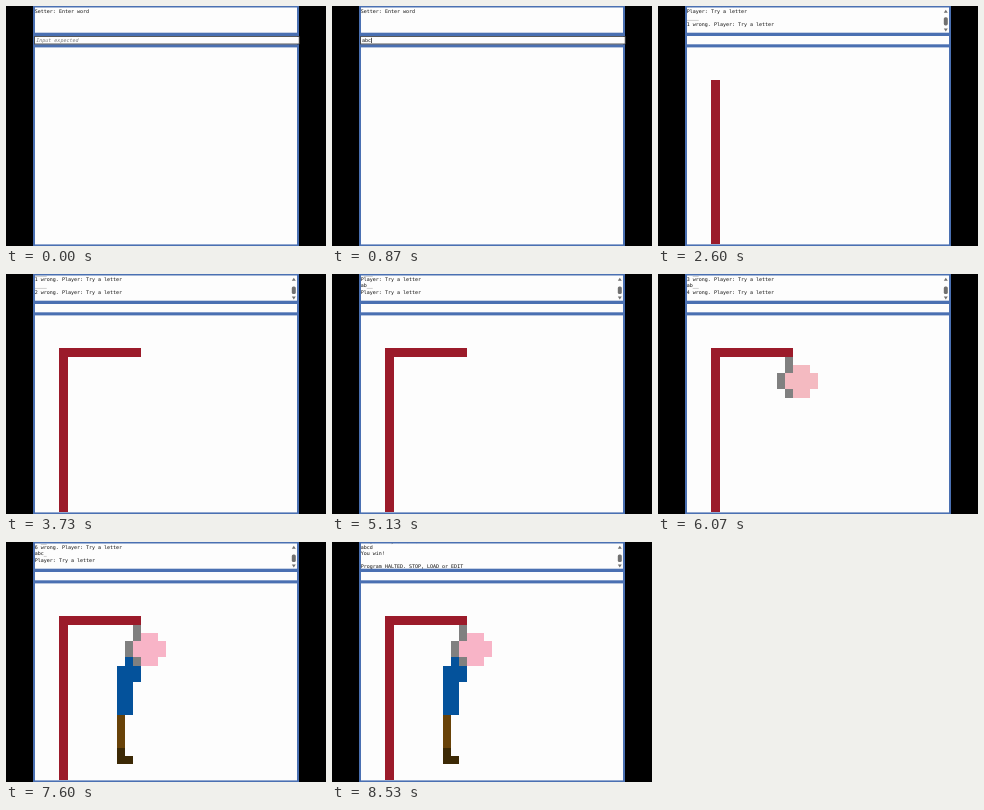
An HTML page for the animation above (8.59 s loop, 320 by 240 pixels).

```html
<!DOCTYPE html>
<html lang="en">
<head>
<meta charset="utf-8">
<title>Hangman</title>
<style>
  html, body { margin: 0; height: 100%; overflow: hidden; background: #000; }
  svg { display: block; width: 100%; height: 100%; }
  text { font: 5px "DejaVu Sans Mono", monospace; fill: #111; }
  #hint { font-style: italic; fill: #777; }
  .paper { fill: #fdfdfd; }
</style>
</head>
<body>
<svg viewBox="0 0 320 240">
  <clipPath id="top"><rect x="29" y="1.5" width="262" height="25.5"/></clipPath>
  <rect x="27" width="266" height="240" fill="#4a70b2"/>
  <rect class="paper" x="29" y="1.5" width="262" height="25.2"/>
  <rect class="paper" x="29" y="30" width="262" height="8.3"/>
  <rect class="paper" x="29" y="41.4" width="262" height="197"/>
  <g id="log" clip-path="url(#top)"></g>
  <g id="scroll" fill="#707070">
    <path d="M285.8 6.8h4l-2-3zM285.8 22.4h4l-2 3z"/>
    <rect id="thumb" x="285.8" width="4" rx="1.6"/>
  </g>
  <g id="input">
    <rect x="28.6" y="30.6" width="264.6" height="7.4" fill="#fdfdfd" stroke="#333" stroke-width=".8"/>
    <text id="hint" x="30.3" y="36">Input expected</text>
    <text id="typed" x="30" y="36"></text>
    <rect id="caret" y="31.8" width=".7" height="5.2" fill="#111"/>
  </g>
  <g id="drawing" transform="translate(28.8 41.6) scale(8.2)" shape-rendering="crispEdges"></g>
</svg>
<script>
const LOOP = 8590, PITCH = 6.2, CHAR = 3.01;
const $ = id => document.getElementById(id);
const ask = 'Player: Try a letter';
const wrong = n => `${n} wrong. ${ask}`;

// [time, lines printed]
const prints = [
  [0, 'Setter: Enter word'],
  [1200, ask],
  [2600, '____', wrong(1)],
  [3670, '____', wrong(2)],
  [4330, 'a___', ask],
  [5130, 'ab__', ask],
  [5670, 'ab__', wrong(3)],
  [6070, 'ab__', wrong(4)],
  [6470, 'ab__', wrong(5)],
  [6870, 'ab__', wrong(6)],
  [7400, 'abc_', ask],
  [8130, 'abcd', 'You win!', '', 'Program HALTED. STOP, LOAD or EDIT']
];
const keys = [200, 330, 870, 1000];

// Blocks on a 32 by 24 grid: path, start, first colour, settled colour, settling time
const red = [155, 27, 42], grey = [128, 128, 128], blue = [4, 82, 155];
const parts = [
  ['M3 4h1v20h-1z', 2600, red],
  ['M3 4h10v1h-10z', 3670, red],
  ['M12 5h1v2h-1zM11 7h1v2h-1zM13 7h1v2h-1zM12 9h1v1h-1z', 5670, grey],
  ['M13 6h2v1h1v2h-1v1h-2v-1h-1v-2h1z', 6070, [244, 186, 193], [248, 180, 199], 130],
  ['M11 9h1v1h1v2h-1v4h-2v-6h1z', 6470, blue],
  ['M10 16h1v5h-1z', 6870, [75, 59, 74], [104, 66, 8], 400],
  ['M10 20h1v1h1v1h-2z', 6870, [42, 42, 66], [60, 41, 5], 400]
].map(([d, start, from, to = from, span = 1]) => {
  const el = make('path', $('drawing'));
  el.setAttribute('d', d);
  return { el, start, from, to, span };
});
const rows = Array.from({ length: 5 }, () => make('text', $('log')));
rows.forEach(r => r.setAttribute('x', 28.8));

function make(tag, parent) {
  return parent.appendChild(document.createElementNS('http://www.w3.org/2000/svg', tag));
}
function show(el, on) {
  el.style.display = on ? '' : 'none';
}

function drawLog(t) {
  const lines = prints.filter(p => t >= p[0]).flatMap(p => p.slice(1));
  if (t < 8130) lines.push('');
  const scrolled = lines.length > 4;
  const first = scrolled ? lines.length - 5 : 0;
  const base = scrolled ? 7.2 - PITCH : 6.8;
  rows.forEach((row, i) => {
    row.textContent = lines[first + i] || '';
    row.setAttribute('y', base + i * PITCH);
  });
  show($('scroll'), scrolled);
  const height = lines.length > 5 ? 7.6 : 8.2;
  $('thumb').setAttribute('y', (lines.length > 5 ? 20 : 19.4) - height);
  $('thumb').setAttribute('height', height);
}

function drawInput(t) {
  const count = keys.filter(k => t >= k).length;
  show($('input'), t < 1200);
  show($('hint'), !count);
  show($('caret'), count && !(t >= 600 && t < 870));
  $('typed').textContent = 'abcd'.slice(0, count);
  $('caret').setAttribute('x', 30.2 + count * CHAR);
}

function drawFigure(t) {
  for (const { el, start, from, to, span } of parts) {
    show(el, t >= start);
    const k = Math.max(0, Math.min(1, (t - start) / span));
    el.setAttribute('fill', `rgb(${from.map((c, i) => Math.round(c + (to[i] - c) * k))})`);
  }
}

const begin = performance.now();
function frame() {
  const t = (performance.now() - begin) % LOOP;
  drawLog(t);
  drawInput(t);
  drawFigure(t);
  requestAnimationFrame(frame);
}
frame();
</script>
</body>
</html>
```
